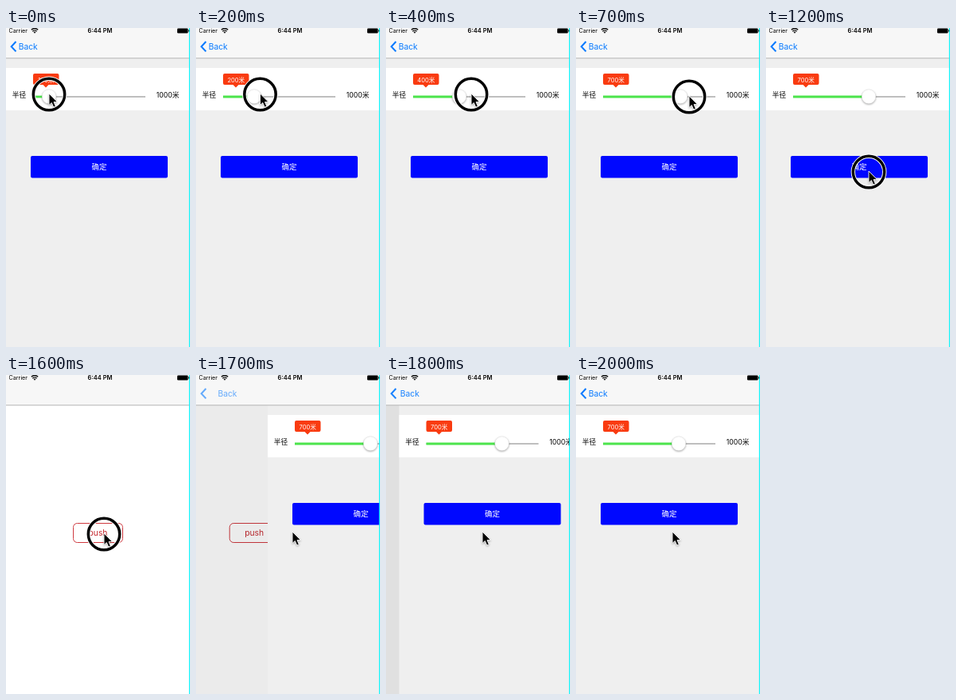
Recreate the animation shown at these times as an HTML page. Size 231x399 px, loop 2.2 s.

```html
<!DOCTYPE html>
<html lang="zh">
<head>
<meta charset="utf-8">
<style>
html, body { margin: 0; width: 100%; height: 100%; overflow: hidden; background: #fff; }
svg { display: block; width: 231px; height: 399px; }
text { font-family: Inter, "Noto Sans CJK SC", "Noto Sans CJK", sans-serif; }
.mid { text-anchor: middle; }
#knob { filter: drop-shadow(0 1.2px 1.2px rgba(0, 0, 0, .35)); }
#arrow { filter: drop-shadow(0 1px 1px rgba(0, 0, 0, .3)); }
</style>
</head>
<body>
<svg viewBox="0 0 231 399">
  <rect width="231" height="399" fill="#fff"/>
  <g id="home">
    <rect x="84.5" y="185.5" width="62" height="24" rx="5" fill="none" stroke="#cf3a40"/>
    <text class="mid" x="115.5" y="201" font-size="10.3" fill="#c4272d">push</text>
  </g>
  <rect id="dim" width="231" height="399" opacity="0"/>

  <g id="page">
    <rect width="231" height="399" fill="#efefef"/>
    <rect y="50" width="231" height="53" fill="#fff"/>
    <g font-size="8.7">
      <text x="7.8" y="87.3">半径</text>
      <text x="188.8" y="87.3">1000米</text>
    </g>
    <path d="M34 86H175" stroke="#aaa" stroke-width="1.6"/>
    <path id="fill" stroke="#4ce44c" stroke-width="2.8"/>
    <path d="M36 57h28.500a2 2 0 0 1 2 2v10a2 2 0 0 1-2 2H53.500l-3.500 3.500-3.500-3.500H36a2 2 0 0 1-2-2v-10a2 2 0 0 1 2-2z" fill="#f93b10"/>
    <text id="value" class="mid" x="50.300" y="67.800" font-size="7.600" fill="#fff"></text>
    <circle id="knob" cy="85.700" r="8.800" fill="#fff" stroke="#ddd" stroke-width=".4"/>
    <rect x="31" y="160" width="172" height="27.500" rx="2" fill="#0008ff"/>
    <text class="mid" x="117" y="177.300" font-size="9.500" fill="#fff">确定</text>
  </g>

  <rect width="231" height="38" fill="#f7f7f7"/>
  <rect y="37.300" width="231" height="1" fill="#b5b5b5"/>
  <text x="3.500" y="6" font-size="7.200">Carrier</text>
  <text class="mid" x="118" y="6" font-size="7.500" font-weight="600">6:44 PM</text>
  <g fill="none" stroke="#000" stroke-width="1.300">
    <path d="M31.800 2.300a6 6 0 0 1 8.400 0M33.400 4.200a3.700 3.700 0 0 1 5.200 0"/>
    <path d="M36 6.800l-1.400-1.500a2 2 0 0 1 2.800 0z" fill="#000" stroke="none"/>
  </g>
  <rect x="215" y=".5" width="13.500" height="6" rx="1.200"/>
  <rect x="229" y="2.300" width="1" height="2.300"/>
  <g id="back" fill="#087aff">
    <path d="M12.500 17L6.700 23.200l5.800 6.200" fill="none" stroke="#087aff" stroke-width="2"/>
    <text id="backText" x="15.700" y="27" font-size="10.300">Back</text>
  </g>
  <rect x="229.800" width="1.200" height="399" fill="#16f5fa"/>

  <g id="pointer">
    <g id="ring" fill="none">
      <circle cy="1" r="19.700" stroke="#fff" stroke-width="5.400"/>
      <circle cy="1" r="19.700" stroke="#000" stroke-width="3.500"/>
    </g>
    <path id="arrow" d="M0 0V14.500L3.300 11.500 5.700 17 8.300 15.900 6 10.600H10.500z" stroke="#fff" stroke-width=".9"/>
  </g>
</svg>
<script>
const LOOP = 2200, STEP = 100, WIDTH = 231;
const $ = id => document.getElementById(id);
const set = (id, attrs) => {
  for (const name in attrs) $(id).setAttribute(name, attrs[name]);
};

// Each key: time in ms, then the values at that time.
const cursor = [[0, 54, 82], [400, 107, 82], [700, 142, 85], [800, 142, 85],
  [1200, 129, 179], [1300, 127, 183], [1400, 127, 183], [1600, 123, 198], [1700, 121, 196]];
const knob = [[0, 54], [400, 92], [700, 131], [800, 131], [900, 129]];
const slide = [[1200, 0], [1300, WIDTH], [1600, WIDTH], [1700, 90], [1800, 16.5], [1900, 2], [2000, 0]];

function at(keys, t) {
  const next = keys.findIndex(k => k[0] > t);
  if (next < 0) return keys[keys.length - 1].slice(1);
  if (next === 0) return keys[0].slice(1);
  const a = keys[next - 1], b = keys[next];
  const p = (t - a[0]) / (b[0] - a[0]);
  return a.slice(1).map((v, i) => v + (b[i + 1] - v) * p);
}

function draw(now) {
  const t = Math.floor(now % LOOP / STEP) * STEP;
  const [x, y] = at(cursor, t), [kx] = at(knob, t), [offset] = at(slide, t);
  const shown = 1 - offset / WIDTH;
  const pressed = t < 900 || t === 1200 || t === 1600;

  set('pointer', { transform: `translate(${x} ${y})` });
  set('ring', { visibility: pressed ? 'visible' : 'hidden' });
  set('knob', { cx: kx });
  set('fill', { d: `M34 86H${kx}` });
  $('value').textContent = Math.round((kx - 43) / 12.3) * 100 + '米';

  set('page', { transform: `translate(${offset} 0)` });
  set('home', { transform: `translate(${-0.3 * WIDTH * shown} 0)` });
  set('dim', { opacity: 0.13 * shown });
  set('back', { opacity: shown });
  set('backText', { x: 15.7 + offset * 0.13 });
  requestAnimationFrame(draw);
}
requestAnimationFrame(draw);
</script>
</body>
</html>
```
